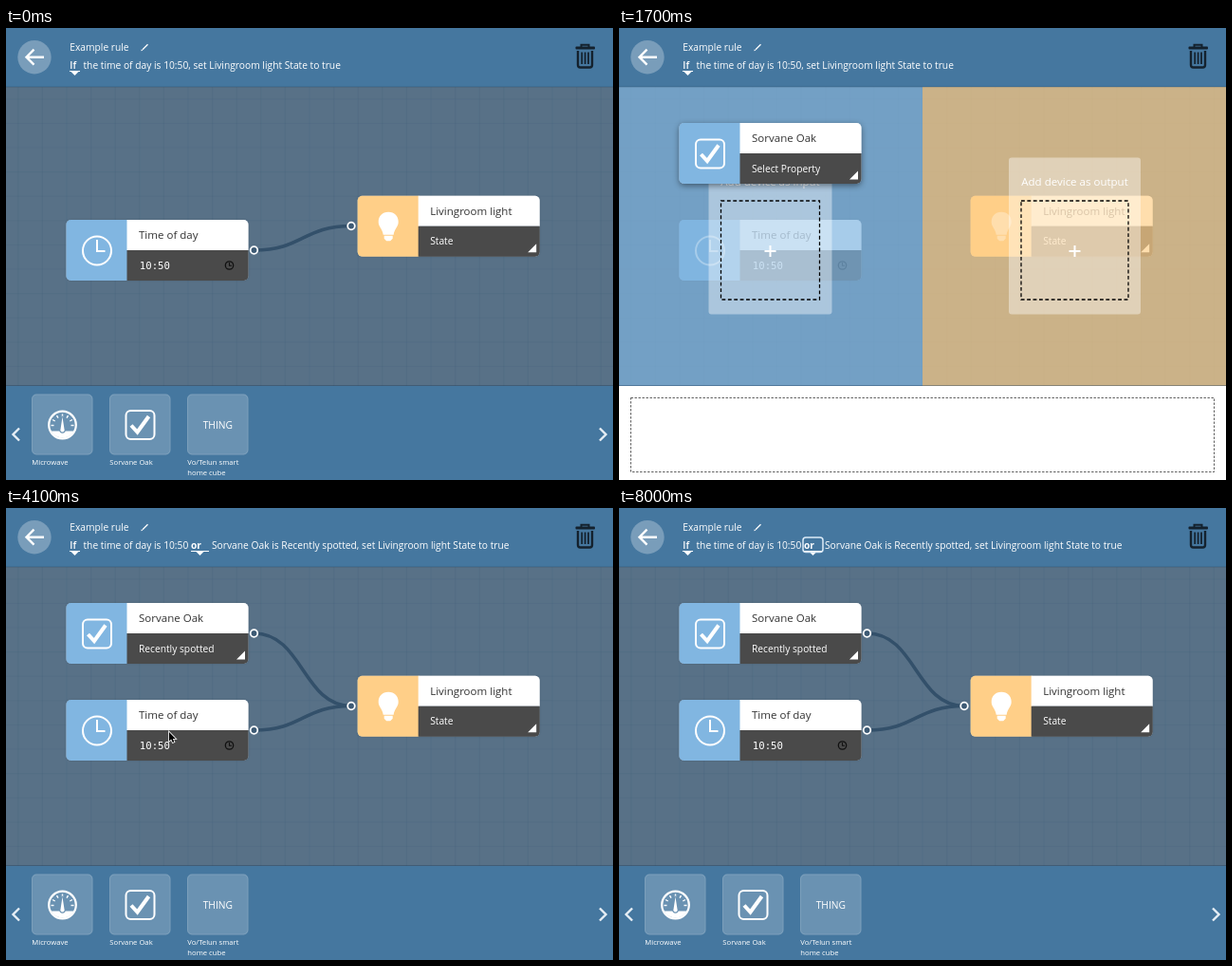
Write an HTML page with a canvas that moves like this. It is 640 px wide and 476 px high and loops after 8.1 s.

```html
<!DOCTYPE html>
<html lang="en">
<head>
<meta charset="utf-8">
<title>Rule editor</title>
<style>
html, body { margin: 0; width: 100%; height: 100%; overflow: hidden; background: #45779f; }
canvas { display: block; width: 640px; height: 476px; }
</style>
</head>
<body>
<canvas id="stage" width="640" height="476"></canvas>
<script>
const c = document.getElementById('stage').getContext('2d');
const LOOP = 8100, STEP = 100;
const DEVICE = 'Sorvane Oak';
const BLUE = '#81b6e1', ORANGE = '#ffcf88', DARK = '#4a4a4a', PANEL = '#45779f', FIELD = '#587187';
const SANS = '"Open Sans", sans-serif', MONO = '"DejaVu Sans Mono", monospace';

// Keyframes: [time, x, y]
const CARD = [[300, 109, 448], [600, 114, 458], [700, 114, 450], [900, 114, 450], [1200, 86, 67],
  [1500, 86, 67], [1700, 63.5, 100]];
const CURSOR = [[2700, 195, 148], [2800, 195, 148], [3300, 185, 212], [3600, 185, 212], [3900, 172, 236],
  [4500, 172, 236], [5100, 207, 44], [5800, 207, 44], [6100, 209, 22], [6400, 209, 22], [6600, 207, 44]];

const ramp = (t, a, b) => Math.min(1, Math.max(0, (t - a) / (b - a)));

function along(keys, t) {
  const i = keys.findIndex(k => k[0] > t);
  if (i < 0) return keys[keys.length - 1].slice(1);
  if (i === 0) return keys[0].slice(1);
  const [a, b] = [keys[i - 1], keys[i]];
  const p = ramp(t, a[0], b[0]), e = p * p * (3 - 2 * p);
  return [a[1] + (b[1] - a[1]) * e, a[2] + (b[2] - a[2]) * e];
}

function rect(x, y, w, h, fill, r = 0) {
  c.beginPath();
  c.roundRect(x, y, w, h, r);
  c.fillStyle = fill;
  c.fill();
}

function outline(x, y, w, h, r, color = '#fff', width = 2) {
  c.beginPath();
  c.roundRect(x, y, w, h, r);
  c.strokeStyle = color;
  c.lineWidth = width;
  c.stroke();
}

function stroke(path, color = '#fff', width = 2) {
  c.strokeStyle = color;
  c.lineWidth = width;
  c.stroke(new Path2D(path));
}

function shape(path, fill = '#fff') {
  c.fillStyle = fill;
  c.fill(new Path2D(path));
}

function ring(x, y, r, color = '#fff', width = 2, fill) {
  c.beginPath();
  c.arc(x, y, r, 0, 7);
  if (fill) { c.fillStyle = fill; c.fill(); }
  c.strokeStyle = color;
  c.lineWidth = width;
  c.stroke();
}

// y is the baseline
function text(s, x, y, { size = 10.24, color = '#fff', weight = 400, font = SANS, align = 'left' } = {}) {
  c.font = `${weight} ${size}px ${font}`;
  c.textAlign = align;
  c.fillStyle = color;
  c.fillText(s, x, y);
}

function dashed(x, y, w, h, width, color) {
  c.setLineDash([3 * width, 2 * width]);
  c.strokeStyle = color;
  c.lineWidth = width;
  c.strokeRect(x, y, w, h);
  c.setLineDash([]);
}

function faded(alpha, draw) {
  if (alpha <= 0) return;
  c.save();
  c.globalAlpha = alpha;
  draw();
  c.restore();
}

function at(x, y, draw) {
  c.save();
  c.translate(x, y);
  draw();
  c.restore();
}

// Icons in a 64 by 64 box
const icons = {
  clock() {
    ring(32.5, 32.5, 15);
    stroke('M32.5 21V33H41');
  },
  check() {
    outline(17.5, 17.5, 30, 30, 5);
    stroke('M23 33L29.5 40L41.5 23.5', '#fff', 4);
  },
  bulb() {
    shape('M32.5 17C26 17 22 21.5 22 27.5C22 33 26.5 35 27 41H38C38.5 35 43 33 43 27.5C43 21.5 39 17 32.5 17ZM28 42H37V45L34.5 47.5H30.5L28 45Z');
  },
  gauge() {
    ring(32.5, 32.5, 14.3, '#fff', 2.2);
    c.beginPath();
    c.arc(32.5, 32.5, 13.5, .5, Math.PI - .5);
    c.fillStyle = '#fff';
    c.fill();
    for (let i = 0; i < 7; i++) {
      const a = Math.PI * (1 + i / 6), x = Math.cos(a), y = Math.sin(a);
      stroke(`M${32.5 + 9 * x} ${33 + 9 * y}L${32.5 + 12 * x} ${33 + 12 * y}`, '#fff', 1.4);
    }
    shape('M32.5 22L35.8 37A3.4 3.4 0 1 1 29.2 37Z', '#6b92b2');
    shape('M32.5 24L34.5 37A2.2 2.2 0 1 1 30.5 37Z');
  }
};

// A shadow that stays outside the card, so a see-through icon area keeps its background
function cardShadow(lifted) {
  c.save();
  const outside = new Path2D('M-20-20H212V84H-20Z');
  outside.roundRect(0, 0, 192, 64, 5);
  c.clip(outside, 'evenodd');
  c.shadowColor = lifted ? 'rgba(0,0,0,.45)' : 'rgba(0,0,0,.15)';
  c.shadowBlur = lifted ? 6 : 2;
  c.shadowOffsetY = lifted ? 2 : 0;
  rect(0, 0, 192, 64, '#fff', 5);
  c.restore();
}

function card(x, y, name, icon, color, prop, { lifted = false, corner = true } = {}) {
  at(x, y, () => {
    cardShadow(lifted);
    if (color) rect(0, 0, 65, 64, color, [5, 0, 0, 5]);
    icons[icon]();
    rect(64, 0, 128, 32, '#fff', [0, 5, 0, 0]);
    rect(64, 32, 128, 32, DARK, [0, 0, 5, 0]);
    text(name, 76.5, 20, { size: 11.52, color: '#333' });
    text(prop, 76.5, 51.5);
    if (corner) shape('M188.5 50.5V59.5H179.5Z');
  });
}

function timeCard() {
  card(63.5, 202, 'Time of day', 'clock', BLUE, '', { corner: false });
  text('10:50', 140.8, 254, { size: 10.7, font: MONO });
  ring(235.5, 250, 4.2, '#111', 1.3);
  stroke('M235.5 247V250.3H238', '#111', 1.1);
}

function wire(y) {
  stroke(`M261.5 ${y}C313 ${y} 313 208.5 364 208.5`, '#33506a', 3.6);
}

const node = (x, y) => ring(x, y, 3.8, '#fff', 1.8, '#3d5a74');

function field() {
  rect(0, 62, 640, 315, FIELD);
  let grid = '';
  for (let x = 12.8; x < 640; x += 25.6) grid += `M${x} 62V377`;
  for (let y = 74.8; y < 377; y += 25.6) grid += `M0 ${y}H640`;
  stroke(grid, 'rgba(50,85,115,.12)', 1);
}

function options(open, pointerY) {
  c.save();
  c.beginPath();
  c.roundRect(127.5, 132, 128, 32 + 96 * open, [0, 0, 5, 0]);
  c.clip();
  rect(127.5, 132, 128, 128, DARK);
  const hovered = Math.floor((pointerY - 132) / 32);
  rect(127.5, 132 + 32 * hovered, 128, 32, '#999');
  ['Select Property', 'Details', 'Minu...', 'Recently spotted'].forEach((s, i) => text(s, 140, 151.5 + 32 * i));
  rect(191, 171, 52, 17.5, '#c4c4c6', 3);
  text('<', 180, 215.5);
  text('0', 216, 215.5);
  stroke('M178 218.5H210.5M214 218.5H243', '#ddd', 1);
  stroke('M203 210.5L206 213.5L209 210.5', '#fff', 1);
  c.restore();
}

function dropZone(x, w, label) {
  rect(x, 136.5, w, 165, 'rgba(255,255,255,.4)', 3);
  const mid = x + w / 2;
  text(label, mid, 166, { size: 11.52, align: 'center' });
  dashed(x + 13, 182, w - 26, 104, 1.28, '#000');
  stroke(`M${mid - 6} 235H${mid + 6}M${mid} 229V241`);
}

function dropLayer() {
  faded(c.globalAlpha * .69, () => {
    rect(0, 62, 320, 315, '#80b6e1');
    rect(320, 62, 320, 315, ORANGE);
  });
  dropZone(94.5, 130, 'Add device as input');
  dropZone(411, 139, 'Add device as output');
}

function header(joined, focused) {
  rect(0, 0, 640, 62, PANEL);
  rect(0, 61.5, 640, 1, 'rgba(30,60,90,.3)');
  c.beginPath();
  c.arc(30, 30.7, 17.7, 0, 7);
  c.fillStyle = 'rgba(255,255,255,.28)';
  c.fill();
  stroke('M40 30.7H22M29.5 22.7L21.5 30.7L29.5 38.7', '#fff', 2.4);

  text('Example rule', 67.3, 23.7);
  stroke('M144 22.8L149.5 17.3', '#fff', 1.3);
  shape('M142.3 24.3L142.9 22.3L144.3 23.7Z');

  text('If', 67.3, 42.5, { weight: 600 });
  stroke('M67 45.5H78', '#fff', 1);
  shape('M68.5 46H76.5L72.5 50Z');
  const end = 'set Livingroom light State to true';
  if (joined) {
    text('the time of day is 10:50', 81.5, 42.5);
    text('or', 195, 42.5, { weight: 700 });
    stroke('M195 45.5H214', '#fff', 1);
    shape('M200.5 46H208.5L204.5 50Z');
    text(`${DEVICE} is Recently spotted, ${end}`, 217, 42.5);
    if (focused) outline(194, 31, 21, 15.5, 3, '#dcebf8', 1.5);
  } else text(`the time of day is 10:50, ${end}`, 81.5, 42.5);

  const ink = '#14222e';
  rect(600.5, 19.5, 20.5, 3, ink, 1);
  stroke('M606.5 20V17.8H614.5V20', ink, 2);
  stroke('M603 24V39Q603 41.5 605.5 41.5H615.5Q618 41.5 618 39V24', ink, 2.4);
  stroke('M607.2 25.5V38M610.6 25.5V38M614 25.5V38', ink, 1.8);
}

function tile(x, label, icon) {
  rect(x, 385.5, 64.5, 64, 'rgba(255,255,255,.2)', 5);
  outline(x + .5, 386, 63.5, 63, 5, 'rgba(255,255,255,.12)', 1);
  if (icon) at(x, 385.5, icons[icon]);
  else text('THING', x + 32.3, 421.7, { align: 'center' });
  label.forEach((s, i) => text(s, x + .3, 460.3 + 10.3 * i, { size: 7.68 }));
}

function tray(drag) {
  rect(0, 377, 640, 99, PANEL);
  tile(27, ['Microwave'], 'gauge');
  tile(109, [DEVICE], 'check');
  tile(191, ['Vo/Telun smart', 'home cube']);
  stroke('M14 421.5L7.5 428L14 434.5M626 421.5L632.5 428L626 434.5', '#e6eef5', 2.4);
  faded(drag, () => {
    rect(0, 377, 640, 99, '#fff');
    dashed(12.5, 389.5, 615, 78, .8, '#333');
  });
  rect(0, 376, 640, 1, 'rgba(30,60,90,.4)');
}

function menu(pointerY) {
  const onAnd = pointerY < 31;
  c.save();
  c.shadowColor = 'rgba(0,0,0,.4)';
  c.shadowBlur = 4;
  rect(189.5, 9.5, 45.5, 41, '#263c50', 4);
  c.restore();
  rect(192, onAnd ? 13 : 31.5, 40.5, 17, '#2b65da', 3);
  const style = { size: 11.5, font: 'Inter, sans-serif' };
  text('and', 204.5, 25.7, style);
  text('or', 204.5, 44.2, style);
  stroke('M195.5 40.5L197.5 43L201.5 37', '#fff', 1.3);
}

function pointer(x, y) {
  const arrow = 'M0 0V9.5L2.2 7.6L3.8 11L5.4 10.3L3.9 7H6.8Z';
  at(x, y, () => {
    stroke(arrow, '#fff', 1.6);
    shape(arrow, '#000');
  });
}

function draw(t) {
  const drag = t < 1700 ? ramp(t, 200, 600) : 1 - ramp(t, 1700, 2200);
  const [px, py] = along(CURSOR, t);
  const [cx, cy] = along(CARD, t);
  const joined = t >= 4000;
  const open = t < 3500 ? ramp(t, 2500, 2700) : 1 - ramp(t, 3800, 4000);
  const popup = t < 5200 ? 0 : 1 - ramp(t, 6600, 6900);

  field();
  faded(1 - drag, () => {
    wire(234);
    if (joined) wire(132);
  });
  timeCard();
  card(370.7, 176.7, 'Livingroom light', 'bulb', ORANGE, 'State');
  faded(1 - drag, () => {
    node(261.5, 234);
    node(364, 208.5);
    if (joined) node(261.5, 132);
  });
  faded(drag, dropLayer);
  header(joined, t >= 6700);
  tray(drag);

  if (t >= 300) {
    card(cx, cy, DEVICE, 'check', cy > 345 ? '' : BLUE, joined ? 'Recently spotted' : 'Select Property',
      { lifted: t < 2000 });
  }
  if (open > 0) options(open, py);
  faded(popup, () => menu(py));

  // The arrow shows while dragging and outside clickable rows
  if (t >= 300 && t < 1600) pointer(cx + 28, cy - 28);
  if (t >= 4000 && t < 6900) pointer(px, py);
}

const start = performance.now();
function tick() {
  const t = (performance.now() - start) % LOOP;
  draw(Math.floor(t / STEP) * STEP);
  requestAnimationFrame(tick);
}
tick();
</script>
</body>
</html>
```
